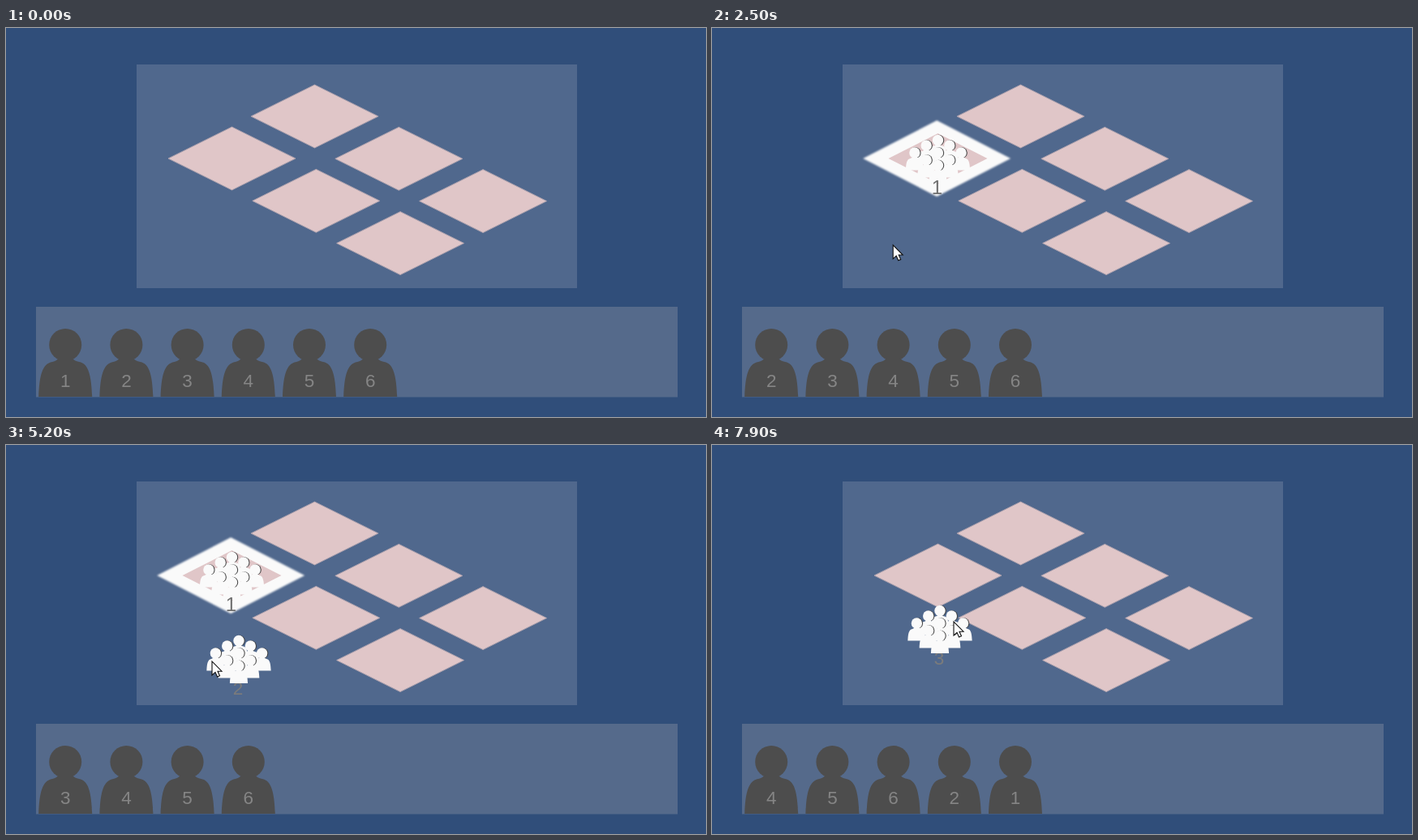
An HTML page for the animation above (8000 ms loop, 863 by 480 pixels).

```html
<!DOCTYPE html>
<html lang="en">
<head>
<meta charset="utf-8">
<title>Unit placement</title>
<style>
  html, body { margin: 0; width: 100%; height: 100%; overflow: hidden; background: #304e7a; }
  svg { display: block; width: 100%; height: 100%; }
  text { font: 22.5px "Liberation Sans", Arial, sans-serif; text-anchor: middle; }
  .tile { fill: #e0c6c8; stroke: #a99fac; stroke-width: 1; }
  .frame { fill: #fafafa; filter: blur(.8px); }
  .inset { fill: #e0c6c8; filter: blur(.5px); }
  .unit { fill: #4d4d4d; }
  .unit text { fill: #858585; }
  .member { fill: #fafafa; }
  .shade { fill: #3c3c3c; }
  .squad text { fill: #7b7b7b; }
  .placed text { fill: #707070; font-size: 24px; }
</style>
</head>
<body>
<svg id="stage" viewBox="0 0 863 480">
  <defs>
    <g id="person">
      <circle cy="20" r="20"/>
      <path d="M-33 84C-32 59-29 43-16 41Q-11 40-8 36H8Q11 40 17 41C29 43 32 59 33 84Z"/>
    </g>
  </defs>
  <rect width="863" height="480" fill="#304e7a"/>
  <rect x="161" y="45" width="543" height="276" fill="#50688d"/>
  <rect x="37" y="344" width="791" height="111.5" fill="#556a8b"/>
</svg>
<script>
const LOOP = 8000, STEP = 100, POINTER_SHOWN = 900, UNIT_COUNT = 6;
const stage = document.getElementById('stage');

// Key points of the pointer path; it moves evenly between them
const path = [
  { t: 1000, x: 57, y: 423 }, { t: 1700, x: 169, y: 196 }, { t: 2300, x: 284, y: 183 },
  { t: 2800, x: 132, y: 395 }, { t: 3300, x: 334, y: 277 }, { t: 3600, x: 454, y: 178 },
  { t: 3900, x: 359, y: 256 }, { t: 4500, x: 326, y: 227 }, { t: 5000, x: 349, y: 215 },
  { t: 5200, x: 254, y: 267 }, { t: 5500, x: 106, y: 387 }, { t: 6000, x: 277, y: 161 },
  { t: 6600, x: 90, y: 253 }, { t: 6700, x: 90, y: 253 }, { t: 7000, x: 92, y: 416 },
  { t: 7500, x: 105, y: 408 }, { t: 7900, x: 298, y: 218 }
];

// Each squad is taken, carried at an offset (dx, dy), then dropped on a tile or back on the bench
const actions = [
  { id: 1, take: 1000, drop: 2300, dx: 6, dy: 22, tile: { col: 0, row: 1 } },
  { id: 2, take: 2800, drop: 3500, dx: 34, dy: 24, tile: { col: 1, row: 1 } },
  { id: 2, take: 5000, drop: 5500, dx: -33, dy: 32 },
  { id: 1, take: 6000, drop: 7100, dx: -1, dy: 29 },
  { id: 3, take: 7500, drop: LOOP, dx: 17, dy: 20 }
];

function add(parent, tag, attrs = {}, content = '') {
  const node = document.createElementNS('http://www.w3.org/2000/svg', tag);
  for (const key in attrs) node.setAttribute(key, attrs[key]);
  node.textContent = content;
  return parent.appendChild(node);
}

const move = (node, x, y) => node.setAttribute('transform', `translate(${x} ${y})`);
const show = (node, visible) => { node.style.display = visible ? '' : 'none'; };
const tileCenter = ({ col, row }) => [380.5 + 103.8 * col - 102 * row, 109 + 52.3 * col + 52 * row];

function diamond(parent, cls, w, h, x = 0, y = 0) {
  add(parent, 'path', { class: cls, d: `M${x - w} ${y}l${w} ${-h}l${w} ${h}l${-w} ${h}Z` });
}

// Nine people in a 3 x 3 diamond, rows slightly closer at both ends
function addMembers(parent) {
  for (let k = -2; k <= 2; k++) {
    const y = 15.3 + 9.4 * k - .42 * k ** 3;
    const reach = 2 - Math.abs(k);
    for (let i = -reach; i <= reach; i += 2) {
      const x = i * 14.3;
      add(parent, 'circle', { class: 'shade', cx: x + 1, cy: y + 6.7, r: 6.7 });
      add(parent, 'use', { href: '#person', class: 'member', transform: `translate(${x} ${y}) scale(.335)` });
    }
  }
}

function addSquad(id, placed) {
  const group = add(stage, 'g', { class: placed ? 'squad placed' : 'squad' });
  if (placed) {
    diamond(group, 'frame', 91, 47, -1.3, 29);
    diamond(group, 'inset', 61, 31, 0, 29);
    addMembers(group);
  }
  add(group, 'text', { x: -1, y: 72.5 }, id);
  if (!placed) addMembers(group);
  return group;
}

for (let row = 0; row < 2; row++)
  for (let col = 0; col < 3; col++)
    diamond(stage, 'tile', 78.5, 39, ...tileCenter({ col, row }));

const units = Array.from({ length: UNIT_COUNT }, (_, i) => {
  const node = add(stage, 'g', { class: 'unit' });
  add(node, 'use', { href: '#person' });
  move(node, 73.2 + i * 75.2, 371);
  return { node, label: add(node, 'text', { y: 72 }) };
});

actions.forEach((action, i) => {
  if (!action.tile) return;
  const [x, y] = tileCenter(action.tile);
  action.leave = actions.slice(i + 1).find(next => next.id === action.id).take;
  action.placed = addSquad(action.id, true);
  move(action.placed, x, y - 29);
});
for (const action of actions) action.carried = addSquad(action.id, false);

const pointer = add(stage, 'path', {
  d: 'M0 0V17L4 13.4L6.5 19L9.5 17.8L7 12.2H12Z',
  fill: '#fff', stroke: '#111', 'stroke-width': 1.1
});

function pointerAt(t) {
  const next = path.findIndex(p => p.t > t);
  if (next < 0) return path[path.length - 1];
  const b = path[next], a = path[next - 1] || b;
  const k = a === b ? 0 : (t - a.t) / (b.t - a.t);
  return { x: a.x + (b.x - a.x) * k, y: a.y + (b.y - a.y) * k };
}

function draw(t) {
  const { x, y } = pointerAt(t);
  show(pointer, t >= POINTER_SHOWN);
  move(pointer, x, y);

  let bench = units.map((_, i) => i + 1);
  for (const { id, take, drop, dx, dy, tile, leave, carried, placed } of actions) {
    show(carried, t >= take && t < drop);
    move(carried, x - dx, y - dy);
    if (placed) show(placed, t >= drop && t < leave);
    if (t >= take) bench = bench.filter(unit => unit !== id);
    if (t >= drop && !tile) bench.push(id);
  }
  units.forEach(({ node, label }, i) => {
    show(node, i < bench.length);
    label.textContent = bench[i] || '';
  });
}

const start = performance.now();
function tick() {
  const t = (performance.now() - start) % LOOP;
  draw(Math.floor(t / STEP) * STEP);
  requestAnimationFrame(tick);
}
tick();
</script>
</body>
</html>
```
